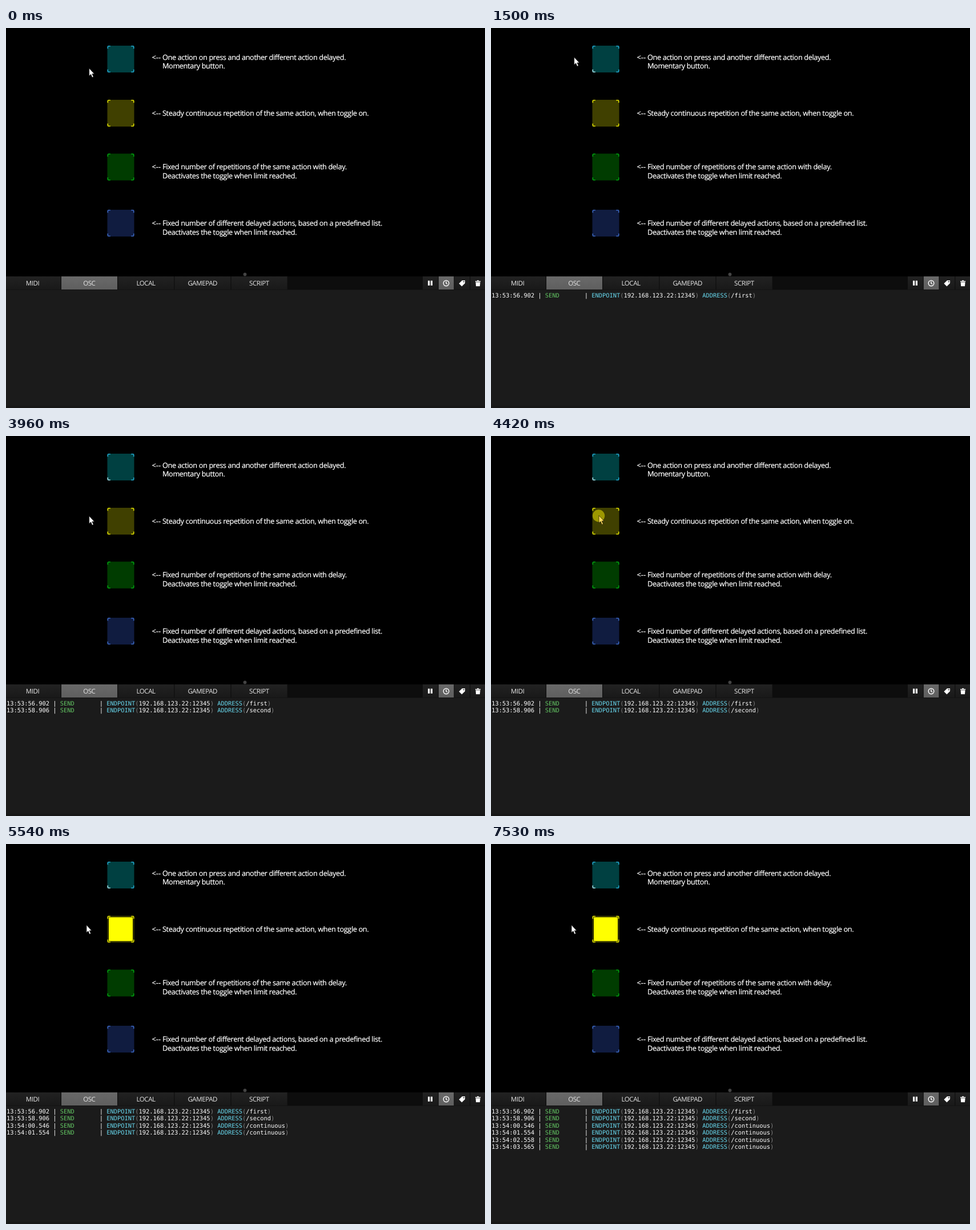
Write an HTML page that moves like this. It is 839 px wide and 667 px high and loops after 8000 ms.

```html
<!DOCTYPE html>
<html lang="en">
<meta charset="utf-8">
<title>Button actions and message log</title>
<style>
  html, body { margin: 0; height: 100%; overflow: hidden; background: #000; }
  svg { display: block; width: 839px; height: 667px; }
  text { fill: #fff; font: 12.7px "Open Sans", "Noto Sans", sans-serif; letter-spacing: -.355px;
         text-rendering: geometricPrecision; white-space: pre; }
  .caption { stroke: #fff; stroke-width: .22px; }
  .arrow { letter-spacing: 0; }
  .tab { font-size: 11.5px; letter-spacing: -.4px; text-anchor: middle; fill: #e8e8e8; }
  .log { font: 10.4px "DejaVu Sans Mono", monospace; letter-spacing: 0; }
  .send { fill: #62c462; }
  .key { fill: #68d8ee; }
  .paren { fill: #808080; }
</style>
<body>
<svg viewBox="0 0 839 667">
  <defs>
    <linearGradient id="idle" x2="0" y2="1"><stop stop-color="#222"/><stop offset="1" stop-color="#191919"/></linearGradient>
    <linearGradient id="active" x2="0" y2="1"><stop stop-color="#696969"/><stop offset="1" stop-color="#5f5f5f"/></linearGradient>
    <path id="corner" d="M.8 5.3V2.3Q.8.8 2.3.8H5.3" fill="none" stroke-width="1.6"/>
  </defs>
  <rect width="839" height="667"/>
  <g id="pads"></g>
  <circle cx="418.5" cy="432.5" r="2.9" fill="#444"/>
  <rect y="436" width="839" height="24" fill="#0d0d0d"/>
  <rect y="459.5" width="839" height="208" fill="#1b1b1b"/>
  <rect y="663.5" width="839" height="4" fill="#171717"/>
  <g id="bar"></g>
  <g fill="#fff">
    <path d="M739 443.5h3.2v8.5H739zM743.8 443.5h3.2v8.5h-3.2z"/>
    <g fill="none" stroke="#fff" stroke-width="1.4">
      <circle cx="771" cy="448" r="4.8"/>
      <path d="M771 445v3.2l2 1.3"/>
    </g>
    <path d="M799 443h5v5l-5.6 5.4-5-5zM801.9 444.2a1 1 0 1 0 .01 0z" fill-rule="evenodd"/>
    <path d="M822 444h2.8l.8-1.2h2l.8 1.2h2.8v1.5H822zM822.6 446.3h8l-.6 7h-6.8z"/>
  </g>
  <circle id="led" cx="187" cy="447.5" r="2.6" fill="#62c462"/>
  <g id="lines"></g>
  <g id="cursor">
    <circle id="click" cx="-.5" cy=".5" r="10.7" fill="#faf000" fill-opacity=".5"/>
    <path id="arrow" d="M0 0V13.2L3 10.5 5.2 16 7.5 15 5.2 9.7H9Z" stroke="#000" stroke-width=".6"/>
  </g>
</svg>
<script>
const $ = id => document.getElementById(id);
const add = (id, markup) => $(id).insertAdjacentHTML('beforeend', markup);
const show = (el, on) => el.setAttribute('visibility', on ? 'visible' : 'hidden');

// [top, fill, corners, lit colour, first baseline, captions]
const limit = 'Deactivates the toggle when limit reached.';
const pads = [
  [31, '#004041', '#22a6cc', '#00ffff', 56, 'One action on press and another different action delayed.', 'Momentary button.'],
  [126, '#404000', '#dede00', '#ffff00', 154.2, 'Steady continuous repetition of the same action, when toggle on.'],
  [220.5, '#003c00', '#00a010', '#00ff00', 248.2, 'Fixed number of repetitions of the same action with delay.', limit],
  [319, '#101c40', '#3b67c0', '#4070ff', 347.4, 'Fixed number of different delayed actions, based on a predefined list.', limit]
];
pads.forEach(([top, fill, edge, lit, base, ...captions], i) => {
  const corners = [[1, 1], [-1, 1], [1, -1], [-1, -1]].map(([sx, sy], k) =>
    `<use href="#corner" id="corner${i}${k}" stroke="${edge}" transform="translate(${sx > 0 ? 0 : 47} ${sy > 0 ? 0 : 47}) scale(${sx} ${sy})"/>`);
  add('pads', `<g transform="translate(177.5 ${top})">
    <rect width="47" height="47" rx="1.5" fill="${fill}"/>
    <g id="lit${i}"><rect x="1.4" y="1.4" width="44.2" height="44.2" fill="#181800"/>
    <rect x="2.5" y="2.5" width="42" height="42" fill="${lit}"/></g>${corners.join('')}</g>
    <text class="caption arrow" x="255.6" y="${base}">&lt;--</text>` +
    captions.map((c, n) => `<text class="caption" x="274" y="${base + n * 15.3}">${c}</text>`).join(''));
});

['MIDI', 'OSC', 'LOCAL', 'GAMEPAD', 'SCRIPT'].forEach((name, i) => add('bar',
  `<rect x="${i * 99.2 - 2.2}" y="436" width="98" height="23" fill="url(#${i == 1 ? 'active' : 'idle'})"/>
   <text class="tab" x="${46.6 + i * 99.2}" y="451.7">${name}</text>`));
for (let i = 0; i < 4; i++) add('bar',
  `<rect x="${730 + i * 27.8}" y="436" width="26.6" height="23" fill="url(#${i == 1 ? 'active' : 'idle'})"/>`);

// [time shown, clock, path]
const log = [
  [910, '13:53:56.902', 'first'], [2890, '13:53:58.906', 'second'],
  [4450, '13:54:00.546', 'continuous'], [5440, '13:54:01.554', 'continuous'],
  [6430, '13:54:02.558', 'continuous'], [7430, '13:54:03.565', 'continuous']
];
const span = (cls, s) => `<tspan class="${cls}">${s}</tspan>`;
const field = (key, value) => span('key', key) + span('paren', '(') + value + span('paren', ')');
log.forEach(([, clock, path], i) => add('lines',
  `<text class="log" x="1" y="${472.7 + i * 12.5}">${clock} | ${span('send', 'SEND')}       | ` +
  `${field('ENDPOINT', '192.168.123.22:12345')} ${field('ADDRESS', '/' + path)}</text>`));

// [start, end, x, y]: the pointer eases to each place in turn
const moves = [
  [30, 30, 147.3, 69.8], [330, 610, 203.7, 54], [1080, 1500, 145.7, 51.3],
  [3680, 3960, 145.7, 140.5], [3960, 4380, 189, 139.5], [4550, 4770, 141, 142.3]
];
function pointer(t) {
  let x = 145.7, y = 70.8;
  for (const [from, to, mx, my] of moves) {
    if (t < from) break;
    const p = to > from ? Math.min(1, (t - from) / (to - from)) : 1;
    const e = p * p * (3 - 2 * p);
    x += (mx - x) * e;
    y += (my - y) * e;
  }
  return `translate(${x} ${y})`;
}

const within = (t, from, to) => t >= from && t < to;
const begin = performance.now();
function draw() {
  const t = Math.max(0, performance.now() - begin) % 8000;
  const pressed = within(t, 880, 1040) || within(t, 4350, 4450);
  $('cursor').setAttribute('transform', pointer(t));
  $('arrow').setAttribute('fill', pressed ? '#ffdb5c' : '#fff');
  show($('click'), pressed);
  const lit = [within(t, 910, 1040), t >= 4450, false, false];
  lit.forEach((on, i) => show($('lit' + i), on));
  $('corner02').setAttribute('stroke', t < 480 ? '#22a6cc' : '#a4e4ec');
  show($('led'), log.some(([at]) => within(t, at, at + 100)));
  log.forEach(([at], i) => show($('lines').children[i], t >= at));
  requestAnimationFrame(draw);
}
draw();
</script>
</body>
</html>
```
